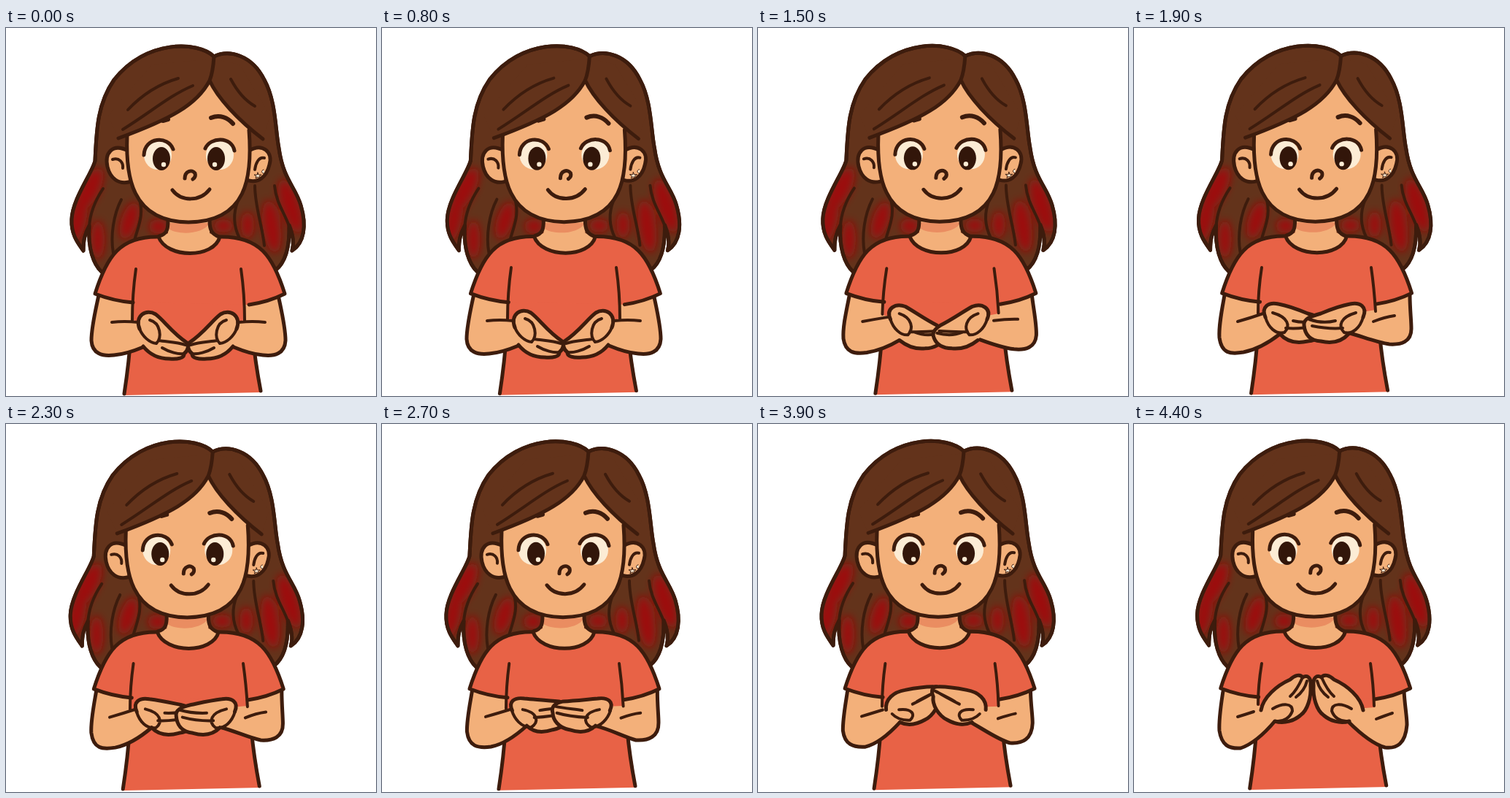
An HTML page for the animation above (4.5 s loop, 507 by 504 pixels).

```html
<!DOCTYPE html>
<html lang="en">
<head>
<meta charset="utf-8">
<title>Girl moving her hands</title>
<style>
html, body { margin: 0; width: 100%; height: 100%; overflow: hidden; background: #fff; }
svg { display: block; width: 507px; height: 504px; fill: none; stroke-linecap: round; stroke-linejoin: round; }
.line { stroke: #3d1c0d; stroke-width: 5; }
.thin { stroke-width: 4; }
.skin { fill: #f3b07a; }
.shade { fill: #ea8d61; }
.shirt { fill: #e86246; }
.hair { fill: #63331b; }
.dark { fill: #32160a; }
.white { fill: #fcecd5; }
.red { fill: #9c100a; }
</style>
</head>
<body>
<svg viewBox="0 0 507 504">
  <defs>
    <path id="mane" d="M285 39C263 18 192 15 148 71C125 104 124 140 122 182C118 199 91 234 90 262C89 283 99 295 106 305C106 290 108 282 114 271C112 302 120 324 131 334L160 330H350L369 332C382 322 389 302 388 270C394 285 395 295 392 305C409 294 412 270 404 243C397 218 380 208 374 165C369 140 370 100 354 71C337 37 306 29 285 39Z"/>
    <clipPath id="inMane"><use href="#mane"/></clipPath>
    <filter id="soft" x="-60%" y="-60%" width="220%" height="220%"><feGaussianBlur stdDeviation="6"/></filter>
  </defs>

  <g class="body">
    <use href="#mane" class="hair line"/>
    <g clip-path="url(#inMane)">
      <g class="red" filter="url(#soft)">
        <ellipse cx="114" cy="222" rx="13" ry="33" transform="rotate(28 114 222)"/>
        <ellipse cx="99" cy="262" rx="11" ry="32" transform="rotate(12 99 262)"/>
        <ellipse cx="169" cy="264" rx="11" ry="26" transform="rotate(18 169 264)"/>
        <ellipse cx="126" cy="290" rx="9" ry="26"/>
        <ellipse cx="209" cy="272" rx="13" ry="10"/>
        <ellipse cx="298" cy="271" rx="13" ry="9"/>
        <ellipse cx="331" cy="270" rx="9" ry="18"/>
        <ellipse cx="364" cy="272" rx="12" ry="36" transform="rotate(-8 364 272)"/>
        <ellipse cx="390" cy="244" rx="13" ry="38" transform="rotate(-18 390 244)"/>
      </g>
    </g>
    <use href="#mane" class="line"/>
    <path class="line thin" d="M133 220C123 235 115 252 114 273M158 235C147 256 143 285 147 308M182 232C190 255 181 272 176 291M318 236C310 256 313 274 320 288M341 216C341 244 351 270 354 298M368 216C370 240 383 255 389 274"/>

    <path class="skin" d="M222 255V281L208 288C220 318 283 318 294 288L279 281V255Z"/>
    <path class="shade" d="M223 267H279C270 283 236 284 223 275Z"/>
    <path class="line" d="M222 264C222 275 221 282 210 285M279 264C279 275 281 282 292 286"/>

    <path class="skin line" d="M167 168C145 157 135 172 139 190C143 207 155 214 168 211"/>
    <path class="line thin" d="M146 180C155 177 161 184 160 192"/>
    <path class="skin line" d="M333 168C352 157 366 170 361 187C357 205 345 212 333 209"/>
    <path class="line thin" d="M354 178C346 176 342 186 341 194"/>
    <path class="white" style="stroke:#3d1c0d;stroke-width:1" d="M345 198L346 201L350 201L347 203L348 206L345 204L342 206L343 203L340 201L344 201ZM353 194C349 195 350 200 354 199"/>

    <path class="skin" d="M166 148C164 200 170 265 250 266C330 265 338 205 333 138L279 66Z"/>
    <path class="line" d="M166 148C164 200 170 265 250 266C330 265 338 205 333 140"/>
    <path class="hair" d="M285 42L279 72C262 105 225 125 154 151L140 120L200 50ZM285 42L279 72C290 96 318 126 352 152L362 120L320 50Z"/>
    <path class="line" d="M285 39C284 54 283 62 279 72C262 105 225 125 154 151M279 72C290 96 318 126 352 152"/>
    <path class="line thin" d="M256 79C225 92 200 114 160 139M236 69C208 77 184 94 167 112M308 70C317 87 327 99 341 107"/>

    <ellipse class="white" cx="208" cy="174" rx="19" ry="20"/>
    <ellipse class="white" cx="293" cy="174" rx="19" ry="20"/>
    <path class="line" d="M189 174C190 149 222 147 229 166M273 165C280 149 309 148 313 168"/>
    <ellipse class="dark" cx="213" cy="179" rx="12" ry="16"/>
    <ellipse class="dark" cx="288" cy="179" rx="12" ry="16"/>
    <circle class="white" cx="216" cy="187" r="3.2"/>
    <circle class="white" cx="286" cy="187" r="3.2"/>
    <path class="line" style="stroke-width:6" d="M281 123C293 118 304 123 311 131M215 127L222 125"/>
    <path class="line" d="M245 206C245 196 255 193 259 199C260 202 259 205 256 207M228 222C240 238 266 238 279 221"/>

    <path class="shirt" d="M174 370L172 430L162 503L351 499L340 430L333 370Z"/>
    <path class="line" d="M171 420Q169 455 162 501M338 420Q341 455 349 497"/>
  </g>

  <g id="arms"></g>

  <g class="body">
    <path class="shirt" d="M209 286C156 285 138 313 122 364Q148 374 174 376L333 379Q360 375 382 364C366 313 348 285 293 286C285 316 220 316 209 286Z"/>
    <path class="line" d="M174 376Q148 374 122 364C138 313 156 285 209 286C220 316 285 316 293 286C348 285 366 313 382 364Q360 375 333 379"/>
  </g>

  <g id="hands"></g>
</svg>

<script>
const LOOP = 4500, STEP = 100;
const NUM = /-?\d+(\.\d+)?/g;

// Change every x y pair of a path; sum in mirror is twice the axis.
const mapXY = (d, fx, fy) => {
  let i = 0;
  return d.replace(NUM, n => i++ % 2 ? fy(+n) : fx(+n));
};
const mirror = (d, sum) => mapXY(d, x => sum - x, y => y);
const shift = (d, dx, dy) => mapXY(d, x => x + dx, y => y + dy);

// Parts: left arm, left folds, right arm, right folds, left hand + lines, right hand + lines.
const pose = (hand, lines, sum, arm, fold, armR, foldR) =>
  [arm, fold, armR, foldR, hand, lines, mirror(hand, sum), mirror(lines, sum)];
const evenPose = (hand, lines, sum, arm, fold, armSum) =>
  pose(hand, lines, sum, arm, fold, mirror(arm, armSum), mirror(fold, armSum));

const cupped = evenPose(
  "M183 412C176 394 192 384 205 392C216 400 228 418 248 431C251 437 249 442 244 446C245 452 235 454 224 453C208 453 196 446 188 436",
  "M183 412C187 422 196 431 206 432C214 424 212 404 197 400M209 428C222 430 234 430 246 434M214 438C224 444 236 447 244 446", 499,
  "M127 366C122 390 117 410 117 428C118 446 132 450 148 448C162 447 176 442 188 437L198 430L194 405L173 400L174 370",
  "M145 403Q162 401 181 403M178 330Q173 365 173 401", 500);

const lifted = evenPose(
  "M182 402C175 386 191 378 204 385C216 395 230 409 250 420C254 426 252 432 247 437C244 444 235 446 223 446C208 446 198 440 189 433",
  "M182 402C186 413 195 422 205 424C213 416 211 398 196 393M208 420C221 420 233 420 245 421M213 429C223 434 235 435 246 433", 496,
  "M126 366C121 390 116 410 117 426C119 443 132 447 148 445C164 443 178 438 189 433L198 426L194 400L172 396L173 370",
  "M144 402Q160 400 180 400M177 330Q172 362 171 393", 499);

const crossed = pose(
  "M180 396C174 382 184 375 198 378C214 381 226 386 238 391C252 395 262 398 261 407C260 418 255 428 238 429C220 433 208 428 200 419",
  "M180 396C184 410 194 420 206 417C215 408 211 396 190 390M208 411C220 412 235 411 250 408M218 401C230 404 240 404 254 399", 494,
  "M124 366C120 388 116 408 117 424C120 446 132 447 150 444C170 440 186 430 200 419L206 412L190 392L171 391L172 370",
  "M142 402Q160 397 180 390M175 328Q170 360 170 391",
  "M378 366C378 385 380 400 380 412C380 430 366 434 350 433C334 431 314 423 296 418L288 412L306 390L331 386L331 370",
  "M357 394Q343 396 328 402M325 328Q329 356 331 388");

const flat = pose(
  "M177 391C172 379 180 373 194 374C212 374 228 373 246 371C255 372 257 378 252 386C254 395 242 407 230 411C216 417 204 416 196 410",
  "M177 391C180 400 188 410 203 414C216 408 216 394 195 392M210 393C222 390 236 388 250 383M215 386C226 381 240 379 252 377", 488,
  "M123 366C120 386 116 404 116 420C118 438 130 442 148 441C164 438 182 424 196 410L204 405L188 386L170 389L171 370",
  "M142 400Q156 396 176 390M174 328Q170 360 170 389",
  "M376 366C376 385 378 398 378 408C378 428 364 434 346 433C330 428 310 416 292 411L284 405L304 386L330 386L330 370",
  "M352 397Q342 398 327 403M325 328Q329 356 330 386");

const raised = pose(
  "M174 392C177 374 196 358 214 350C220 344 228 342 231 347C238 343 243 348 242 358C243 374 238 392 228 399C220 406 206 411 193 407",
  "M195 407C205 408 214 402 217 393C217 382 204 382 190 390M214 373C222 366 227 356 231 347M222 374C230 368 235 360 237 352", 488,
  "M122 366C119 386 116 404 117 420C120 440 130 445 146 444C164 438 182 420 193 407L200 398L188 390L169 385L170 370",
  "M142 401Q152 398 164 394M175 328Q170 358 170 384",
  "M370 366C371 386 374 400 374 412C372 438 360 445 344 443C326 438 306 420 293 407L286 398L304 390L330 388L330 370",
  "M354 396Q345 399 332 404M324 328Q328 356 329 386");

const times = [0, 800, 1200, 1900, 3400, 4400];
const poses = [cupped, cupped.map(d => shift(d, -1, -2)), lifted, crossed, flat, raised];

// Smooth curve through the values at `times` that never overshoots them.
function makeTrack(v) {
  const rate = v.slice(1).map((x, i) => (x - v[i]) / (times[i + 1] - times[i]));
  const slope = v.map((_, i) => {
    const a = rate[Math.max(i - 1, 0)], b = rate[Math.min(i, rate.length - 1)];
    return a * b > 0 ? 2 * a * b / (a + b) : 0;
  });
  return (i, k) => {
    const span = times[i + 1] - times[i], j = 1 - k;
    return v[i] * j * j * (1 + 2 * k) + v[i + 1] * k * k * (3 - 2 * k)
      + span * k * j * (slope[i] * j - slope[i + 1] * k);
  };
}
const tracks = cupped.map((d, part) => {
  const rows = poses.map(p => p[part].match(NUM).map(Number));
  return rows[0].map((_, n) => makeTrack(rows.map(r => r[n])));
});

const addPath = (id, cls) => {
  const p = document.createElementNS("http://www.w3.org/2000/svg", "path");
  p.setAttribute("class", cls);
  document.getElementById(id).append(p);
  return p;
};
const armFill = [addPath("arms", "skin"), addPath("arms", "skin")];
const armLine = [addPath("arms", "line"), addPath("arms", "line")];
const folds = [addPath("hands", "line thin"), addPath("hands", "line thin")];
const hands = ["skin line", "line thin", "skin line", "line thin"].map(c => addPath("hands", c));
const bodies = document.querySelectorAll(".body");

function draw(t) {
  let i = 0;
  while (i < times.length - 2 && t >= times[i + 1]) i++;
  const k = (t - times[i]) / (times[i + 1] - times[i]);
  const d = cupped.map((shape, part) => {
    let n = 0;
    return shape.replace(NUM, () => tracks[part][n++](i, k).toFixed(2));
  });
  for (const side of [0, 1]) {
    const arm = d[side * 2];
    armFill[side].setAttribute("d", arm + "Z");
    armLine[side].setAttribute("d", arm.split("L")[0]);
    folds[side].setAttribute("d", d[side * 2 + 1]);
  }
  hands.forEach((p, n) => p.setAttribute("d", d[n + 4]));
  const drift = t / 4400;
  bodies.forEach(g => g.setAttribute("transform", `translate(${-3.3 * drift} ${-2 * drift})`));
}

function tick() {
  draw(Math.floor(performance.now() % LOOP / STEP) * STEP);
  requestAnimationFrame(tick);
}
tick();
</script>
</body>
</html>
```
